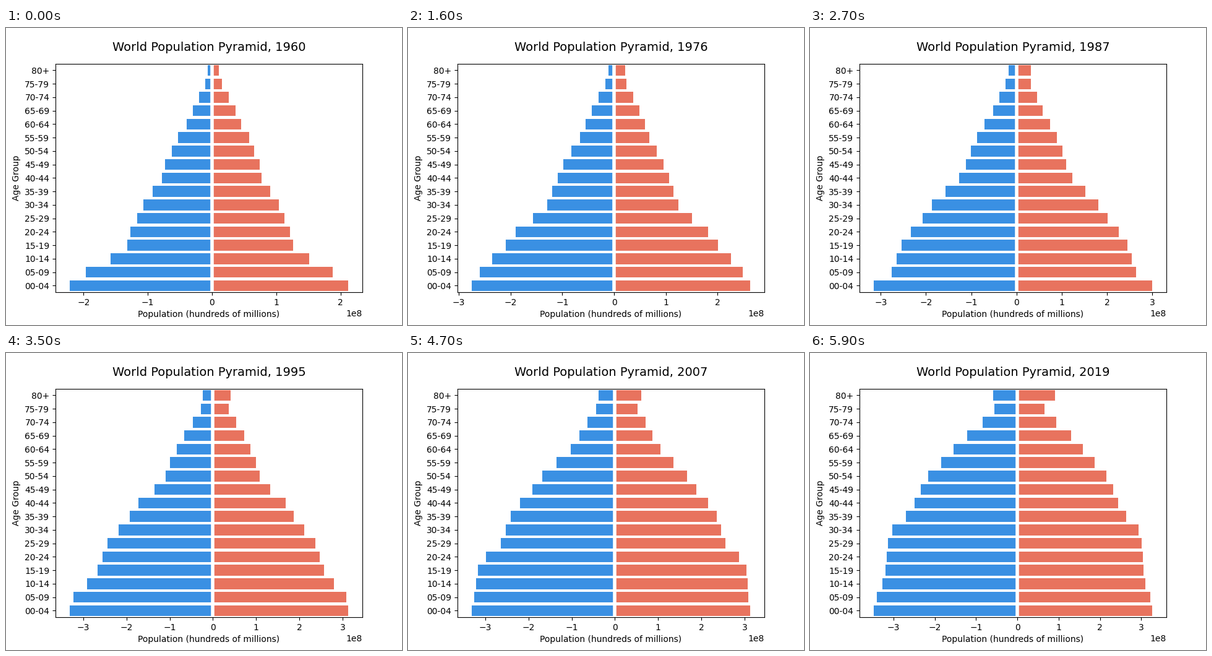
A matplotlib script that plays this animation: 640x480 px, repeating every 6000 ms.

```python
import numpy as np
import matplotlib.pyplot as plt
from matplotlib.animation import FuncAnimation

FIRST, LAST = 1960, 2019
YEARS = np.arange(FIRST, LAST + 1)
AGES = np.arange(120)
GROUPS = [f"{a:02d}-{a + 4:02d}" for a in range(0, 80, 5)] + ["80+"]

# Key points in millions: the first pyramid by age, then boys under five by year
START_AGE = [0, 5, 10, 15, 20, 30, 40, 45, 55, 60, 75]
START_MEN = [222, 196.4, 158, 132, 127, 107, 78, 73, 53, 39.6, 10.7]
BIRTH_YEAR = [1960, 1970, 1982, 1987, 1990, 1995, 2000, 2008, 2014, 2019]
BOYS = [222, 267, 284, 316, 331, 332, 322, 333, 345, 348.6]


def project(start, births, care, ageing):
    """Age a population year by year and return the bar lengths.

    care is the yearly decline of early deaths, ageing scales late deaths.
    """
    pop, rows = start, []
    mid = AGES[:-1] + 0.5
    for year, born in zip(YEARS, births):
        if rows:
            t = year - 0.5 - 1965
            early = (0.003 + 0.01 * np.exp(-mid / 3)) * np.exp(-care * t)
            late = ageing * np.exp(0.087 * (mid - 45) - 0.012 * t)
            pop = np.append(born, pop[:-1] * np.exp(-early - late))
        rows.append(np.append(pop[:80:5], pop[80::5].sum()))
    # Every bar keeps the longest length it has reached
    return np.maximum.accumulate(rows) * 1e6


tail = np.exp(-0.19 * np.clip(AGES - 75, 0, None))
start_men = np.interp(AGES, START_AGE, START_MEN) * tail
start_women = start_men * (0.957 + 0.58 * (AGES / 80) ** 4)
boys = np.interp(YEARS, BIRTH_YEAR, BOYS)
girls = boys * np.interp(YEARS, [1975, 1995, 2019], [0.957, 0.9445, 0.938])

men = project(start_men, boys, care=0.02, ageing=0.008)
women = project(start_women, girls, care=0.03, ageing=0.0058)

fig, ax = plt.subplots(figsize=(6.4, 4.8), dpi=100)
pos = np.arange(len(GROUPS))
left = ax.barh(pos, -men[0], height=0.8, color="#3a90e3")
right = ax.barh(pos, women[0], height=0.8, color="#e8735e")
ax.axvline(0, color="white", lw=4)
ax.set_yticks(pos, GROUPS)
ax.set_ylim(-0.5, len(GROUPS) - 0.5)
ax.set_xlabel("Population (hundreds of millions)")
ax.set_ylabel("Age Group")
title = ax.set_title("", fontsize=14, pad=15)


def update(i):
    for bar, size in zip(left, men[i]):
        bar.set_width(-size)
    for bar, size in zip(right, women[i]):
        bar.set_width(size)
    lo, hi = -men[i].max(), women[i].max()
    margin = 0.05 * (hi - lo)
    ax.set_xlim(lo - margin, hi + margin)
    title.set_text(f"World Population Pyramid, {YEARS[i]}")
    return [*left, *right, title]


anim = FuncAnimation(fig, update, frames=len(YEARS), interval=100,
                     repeat=True, blit=False)
plt.show()
```
